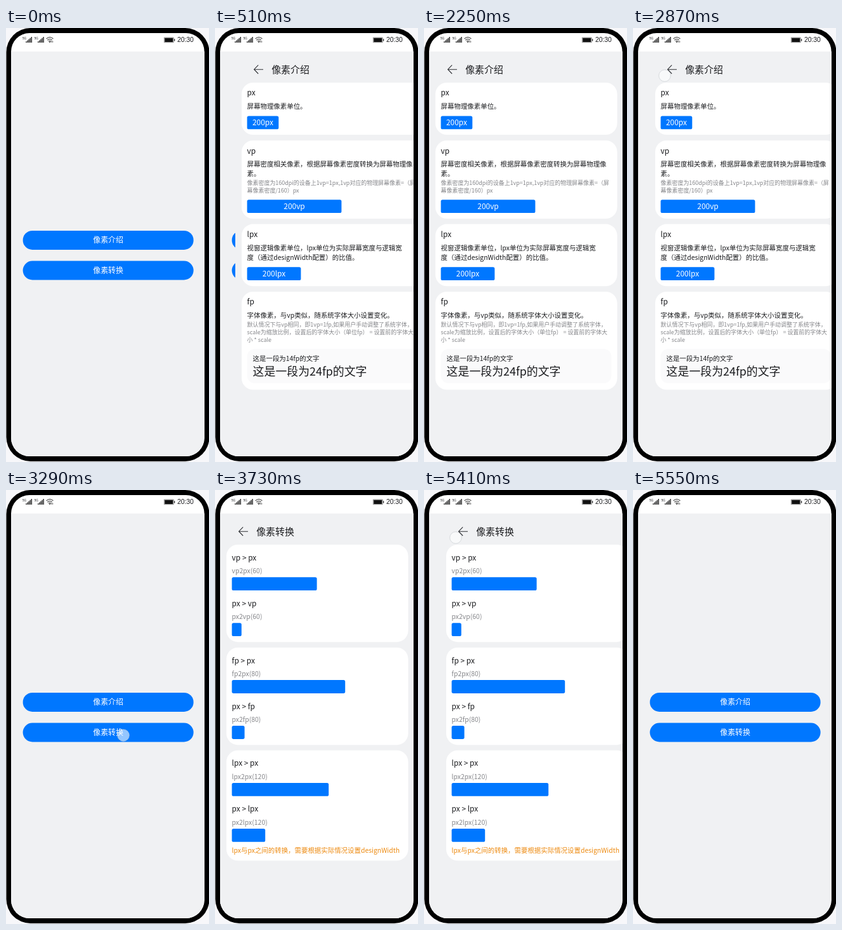
These frames come from a looping animation (320 px wide and 683 px high, 5910 ms). An HTML page:

```html
<!DOCTYPE html>
<html lang="zh-CN">
<head>
<meta charset="utf-8">
<title>像素</title>
<style>
  html, body { margin: 0; width: 100%; height: 100%; overflow: hidden; background: #f7f7fa; }
  svg { display: block; width: 320px; height: 683px; }
  text {
    font-family: "Noto Sans CJK SC", "Noto Sans CJK", sans-serif;
    fill: #1b1c1f;
    white-space: pre;
    text-spacing-trim: space-all;
  }
  .medium { font-weight: 500; }
  .note { fill: #85868a; }
  .warn { fill: #ed8a10; }
  .light { fill: #fff; }
  .clock { font-family: "Liberation Sans", Arial, sans-serif; }
</style>
</head>
<body>
<svg viewBox="0 0 320 683">
  <defs>
    <clipPath id="screen"><rect x="8" y="8" width="304.7" height="666" rx="29"/></clipPath>
  </defs>
  <rect x="0.5" width="320" height="682" rx="38"/>
  <g clip-path="url(#screen)">
    <rect width="320" height="683" fill="#fff"/>
    <g id="home"></g>
    <g id="intro"></g>
    <g id="convert"></g>
    <g id="status"></g>
    <circle id="touch" r="9.3" fill="#fff" fill-opacity=".58" stroke="#c4c8ce" stroke-opacity=".6"/>
  </g>
</svg>
<script>
const BLUE = '#0077ff';
const PAGE = '#f0f1f3';
const SIZE = { xs: 8.96, s: 10.45, m: 11.94, l: 14.92, xl: 17.9 };
const $ = id => document.getElementById(id);

const rect = (x, y, w, h, r, fill) =>
  `<rect x="${x}" y="${y}" width="${w}" height="${h}" rx="${r}" fill="${fill}"/>`;
const text = (x, y, size, str, cls = '', anchor = 'start') =>
  `<text x="${x}" y="${y}" font-size="${size}" class="${cls}" text-anchor="${anchor}">${str.replace(/>/g, '&gt;')}</text>`;
const path = (d, color, width) =>
  `<path d="${d}" fill="none" stroke="${color}" stroke-width="${width}"/>`;

const backdrop = rect(8, 37, 305, 640, 0, PAGE);
const card = (y, bottom) => rect(18, y, 286.5, bottom - y, 18, '#fff');
const bar = (y, w, label) => rect(26.6, y, w, 20.8, 2.6, BLUE) +
  (label ? text(26.6 + w / 2, y + 14.7, SIZE.m, label, 'light medium', 'middle') : '');
const header = title =>
  path('M44.2 58.4L37.6 65.2L44.2 72M37.6 65.2H52', '#303236', 1.1) +
  text(65.2, 70.7, SIZE.l, title, 'medium');
const lines = (size, cls, rows) =>
  rows.map(([y, str]) => text(26.6, y, size, str, cls)).join('');

function buildHome() {
  const button = (y, label) => rect(26.6, y, 269, 30, 15, BLUE) +
    text(161.1, y + 19.3, SIZE.m, label, 'light medium', 'middle');
  return backdrop + button(318.9, '像素介绍') + button(366.5, '像素转换');
}

function buildIntro() {
  return backdrop + header('像素介绍') +
    card(86, 168) + card(177, 300) + card(308.6, 406.3) + card(415, 569.3) +
    lines(SIZE.m, 'medium', [[106.3, 'px'], [197.5, 'vp'], [329, 'lpx'], [435.3, 'fp']]) +
    lines(SIZE.s, '', [
      [127, '屏幕物理像素单位。'],
      [218, '屏幕密度相关像素，根据屏幕像素密度转换为屏幕物理像'],
      [233.4, '素。'],
      [349.5, '视窗逻辑像素单位，lpx单位为实际屏幕宽度与逻辑宽'],
      [364.8, '度（通过designWidth配置）的比值。'],
      [456, '字体像素，与vp类似，随系统字体大小设置变化。'],
    ]) +
    lines(SIZE.xs, 'note', [
      [247, '像素密度为160dpi的设备上1vp=1px,1vp对应的物理屏幕像素=（屏'],
      [259, '幕像素密度/160）px'],
      [470, '默认情况下与vp相同，即1vp=1fp,如果用户手动调整了系统字体，'],
      [481.8, 'scale为缩放比例，设置后的字体大小（单位fp） = 设置前的字体大'],
      [493.6, '小 * scale'],
    ]) +
    bar(138.5, 49.7, '200px') + bar(270.2, 148.8, '200vp') + bar(376.3, 84.8, '200lpx') +
    rect(26.6, 505, 268.8, 54, 12, '#fafafb') +
    text(35.6, 523.8, SIZE.s, '这是一段为14fp的文字') +
    text(35.6, 547.3, SIZE.xl, '这是一段为24fp的文字', 'medium');
}

function buildConvert() {
  const rows = [
    ['vp', 'px', 60, 134], ['px', 'vp', 60, 15.2],
    ['fp', 'px', 80, 178.6], ['px', 'fp', 80, 20],
    ['lpx', 'px', 120, 152.6], ['px', 'lpx', 120, 52.6],
  ];
  const body = rows.map(([from, to, n, w], i) => {
    const y = 86 + Math.floor(i / 2) * 161.9 + (i % 2) * 72;
    return text(26.6, y + 24.6, SIZE.m, `${from} > ${to}`, 'medium') +
      text(26.6, y + 45.4, SIZE.s, `${from}2${to}(${n})`, 'note') +
      bar(y + 51.2, w);
  }).join('');
  return backdrop + header('像素转换') +
    card(86, 239.2) + card(247.9, 401.2) + card(409.7, 583.3) + body +
    text(26.6, 571.3, SIZE.s, 'lpx与px之间的转换，需要根据实际情况设置designWidth', 'warn');
}

function buildStatus() {
  const signal = x => {
    let out = text(x, 17.8, 4.6, '5G', 'clock medium');
    for (let i = 0; i < 5; i++) {
      const h = 1.8 + i * 1.8;
      out += rect(x + 5.2 + i * 2.1, 23 - h, 1.4, h, 0, '#222');
    }
    return out;
  };
  return signal(26) + signal(44.8) +
    path('M63.6 16.9Q69 12.2 74.4 16.9M65.4 19Q69 16 72.6 19M67.2 21Q69 19.6 70.8 21', '#222', 1.1) +
    '<circle cx="69" cy="22.3" r=".9" fill="#222"/>' +
    path('M71.6 22.6V20.6M73.6 22.6V20.6', '#222', 0.9) +
    path('M249.3 15H264.2V22.7H249.3Z', '#777', 0.8) +
    rect(250.2, 15.8, 13.1, 6.1, 0.5, '#111') +
    rect(264.9, 17.2, 1.4, 3.4, 0.5, '#333') +
    text(269.9, 22.3, 10.4, '20:30', 'clock');
}

$('home').innerHTML = buildHome();
$('intro').innerHTML = buildIntro();
$('convert').innerHTML = buildConvert();
$('status').innerHTML = buildStatus();

// Each step: start time, visible page, its x offset, touch point
const LOOP = 5910;
const BACK = [50, 75];
const STEPS = [
  [0],
  [250, null, 0, [185, 339]],
  [440, 'intro', 110],
  [500, 'intro', 24],
  [560, 'intro', 5],
  [630, 'intro', 0],
  [2740, 'intro', 0, BACK],
  [2870, 'intro', 17, BACK],
  [2930],
  [3230, null, 0, [185, 386]],
  [3370, 'convert', 24],
  [3430, 'convert', 0],
  [5150, 'convert', 0, BACK],
  [5350, 'convert', 17, BACK],
  [5420],
];

function draw(t) {
  const [, page, shift = 0, touch] = STEPS.filter(s => s[0] <= t).pop();
  for (const id of ['intro', 'convert']) {
    $(id).style.display = id === page ? '' : 'none';
    $(id).setAttribute('transform', `translate(${shift} 0)`);
  }
  $('touch').style.display = touch ? '' : 'none';
  if (touch) $('touch').setAttribute('transform', `translate(${touch})`);
}

const start = performance.now();
function tick() {
  draw((performance.now() - start) % LOOP);
  requestAnimationFrame(tick);
}
tick();
</script>
</body>
</html>
```
